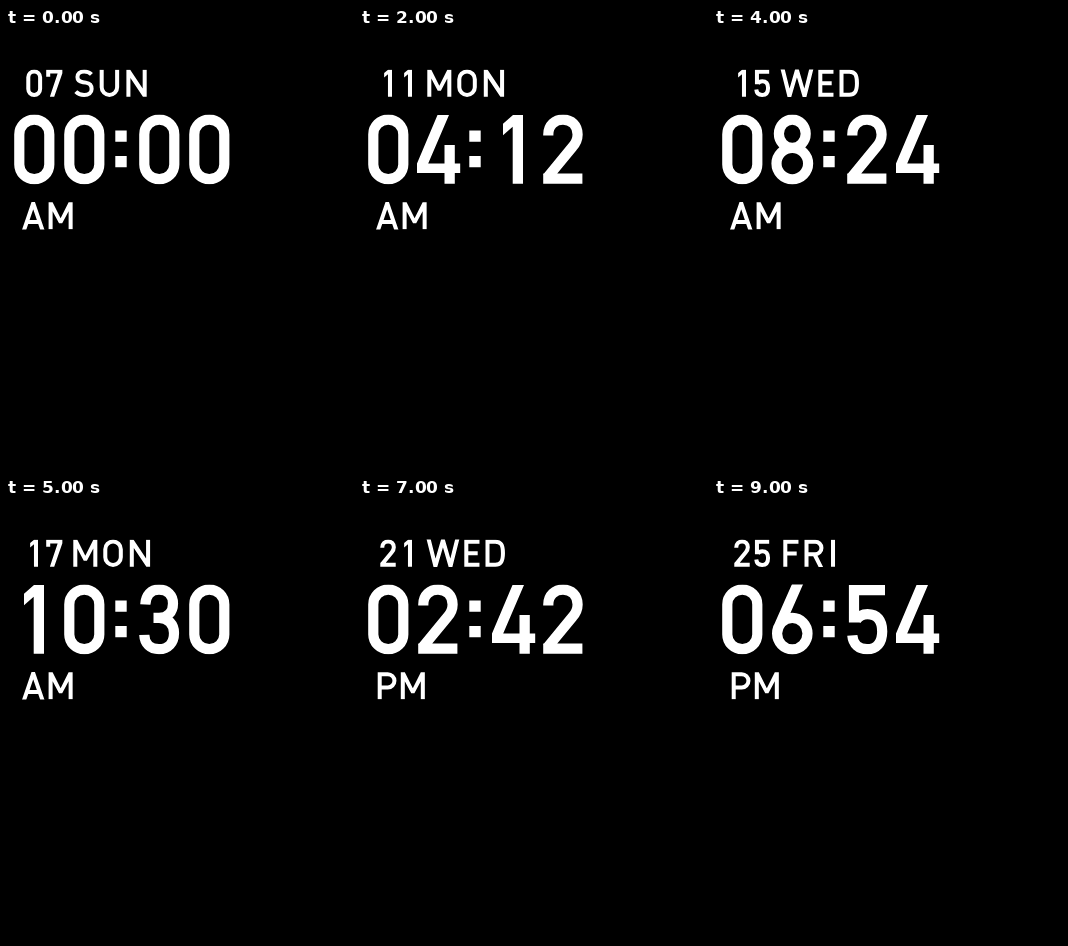
An HTML page for the animation above (10000 ms loop, 348 by 442 pixels).

```html
<!DOCTYPE html>
<html lang="en">
<head>
<meta charset="utf-8">
<title>Clock</title>
<style>
  html, body { margin: 0; width: 100%; height: 100%; overflow: hidden; background: #000; }
  svg { display: block; }
  #stage { width: 348px; height: 442px; }
  #stage svg { overflow: hidden; }
  .line { fill: none; stroke: #fff; stroke-width: 10.2; stroke-miterlimit: 10; }
  .solid { fill: #fff; }
</style>
</head>
<body>
<svg id="stage" viewBox="0 0 348 442" role="img"></svg>
<script>
const ring = (cx, cy, rx, ry = rx) =>
  `M${cx - rx} ${cy}a${rx} ${ry} 0 1 1 ${2 * rx} 0a${rx} ${ry} 0 1 1 ${-2 * rx} 0Z`;

// Round glyphs fill the whole height; flat ones are inset a little at both ends.
const HEIGHT = 70, INSET = 0.6;

const lines = {
  0: 'M5.3 20a15 14.8 0 0 1 30 0V50a15 14.8 0 0 1-30 0Z',
  2: 'M5.3 21V20C5.3 10.5 12 5.2 20 5.2C28.5 5.2 34.6 11 34.6 20C34.6 25 33 28.5 29.5 32.5L3.9 63.6M.2 64.3H39.4',
  3: 'M6.3 20C6.8 10.5 12 5.2 20 5.2C28.5 5.2 34 11 34 19C34 27.5 28.5 33.4 20 33.4H14.5' +
     'M20 33.4C29 33.4 35 40 35 48.5C35 58.5 29 64.8 20 64.8C11.5 64.8 5.6 59.5 5.3 50.5',
  5: 'M38 5.8H7V38M9 36C11.5 32 15 29.8 20.5 29.8C30 29.8 35.2 36 35.2 47' +
     'C35.2 58.5 29.5 64.8 20 64.8C12 64.8 6 60 5.3 51',
  6: ring(20.3, 49.2, 15.2, 15.7) + 'M27.2-4L6.3 43.5',
  8: ring(20.3, 19.3, 13.4, 14.1) + ring(20.3, 49.2, 15.8, 15.7),
  9: ring(20.1, 20.8, 15.2, 15.7) + 'M13.2 74L34.1 26.5',
  A: 'M4.2 74L28.5 3L52.8 74M13 51H44',
  D: 'M5.1 5.7H25C38.5 5.7 44.3 13 44.3 35S38.5 64.3 25 64.3H5.1Z',
  E: 'M38.5 5.7H5.1V64.3H38.5M5.1 35H34',
  F: 'M38.5 5.7H5.1V69.4M5.1 36H34',
  I: 'M5.1.6V69.4',
  O: 'M5.3 24.8a19.7 19.6 0 0 1 39.4 0V45.2a19.7 19.6 0 0 1-39.4 0Z',
  P: 'M5.1 69.4V5.7H25.5a17 16.8 0 0 1 0 33.6H5.1',
  R: 'M5.1 69.4V5.7H27a16 16 0 0 1 0 32H5.1M25 37L43.5 74',
  S: 'M43.5 12.8C39 8 33.5 5.2 25 5.2C14 5.2 8 11 8 19.5C8 28 13.5 31.3 22 32.5L29 33.6' +
     'C39 35 44 40.5 44 49.5C44 59.5 36.5 64.8 25 64.8C16 64.8 9 62 3.8 56.5',
  U: 'M5.3.6V45.2a19.6 19.6 0 0 0 39.2 0V.6',
  W: 'M4.3-4L22.3 68L41.5 2L60.7 68L78.7-4',
};
const solids = {
  1: 'M30 0H20L10 9V20.5L19.7 12V70H30Z',
  4: 'M19.5 0H31L10.2 49.3H26.5V30.5H36.8V49.3H42.2V59H36.8V70H26.5V59H-1V49.3Z',
  7: 'M0 0H41V9.5L20.3 70H9.3L29 10H10.2V18.5H0Z',
  ':': 'M.3 15.8h11.4v11.4h-11.4ZM.3 41.8h11.4v11.4h-11.4Z',
  M: 'M0 70V0H10.2L30.5 41.5L50.8 0H61V70H50.8V23L34.5 54.5H26.5L10.2 23V70Z',
  N: 'M0 70V0H9.6L41.3 48.5V0H51.5V70H42L10.2 21.3V70Z',
};

// Left edge of each letter, in stage pixels.
const letterX = {
  SUN: [68.3, 93.6, 120.4],
  MON: [67.3, 97.2, 123.8],
  WED: [66.6, 104.3, 125.5],
  FRI: [69.3, 90.5, 117],
  AM: [16, 42.6],
  PM: [17.7, 40.8],
};
const dateX = [20.2, 40.2], timeX = [8, 58, 109, 133, 183];

function setText(text, xs, top, scale) {
  const flatten = `translate(0 ${INSET}) scale(1 ${1 - 2 * INSET / HEIGHT})`;
  const glyphs = [...text].map((char, i) => {
    const move = `translate(${xs[i] / scale})`;
    return char in lines
      ? `<path class="line" transform="${move}" d="${lines[char]}"/>`
      : `<path class="solid" transform="${move} ${flatten}" d="${solids[char]}"/>`;
  }).join('');
  return `<svg x="0" y="${top}" width="348" height="${HEIGHT * scale}"` +
    ` viewBox="0 0 ${348 / scale} ${HEIGHT}">${glyphs}</svg>`;
}

const SMALL = 0.394;
const two = n => String(n).padStart(2, '0');
const stage = document.getElementById('stage');

function draw(step) {
  const date = two(7 + 2 * step);
  const day = step ? ['FRI', 'WED', 'MON'][step % 3] : 'SUN';
  const time = two(2 * step % 12) + ':' + two(6 * step);
  const half = step < 6 ? 'AM' : 'PM';
  stage.setAttribute('aria-label', `${date} ${day} ${time} ${half}`);
  stage.innerHTML =
    setText(date, dateX, 41.4, SMALL) +
    setText(day, letterX[day], 41.4, SMALL) +
    setText(time, timeX, 86.4, 1) +
    setText(half, letterX[half], 174, SMALL);
}

let shown = -1;
const start = performance.now();
function tick() {
  const step = Math.floor((performance.now() - start) / 1000) % 10;
  if (step !== shown) draw(shown = step);
  requestAnimationFrame(tick);
}
tick();
</script>
</body>
</html>
```
